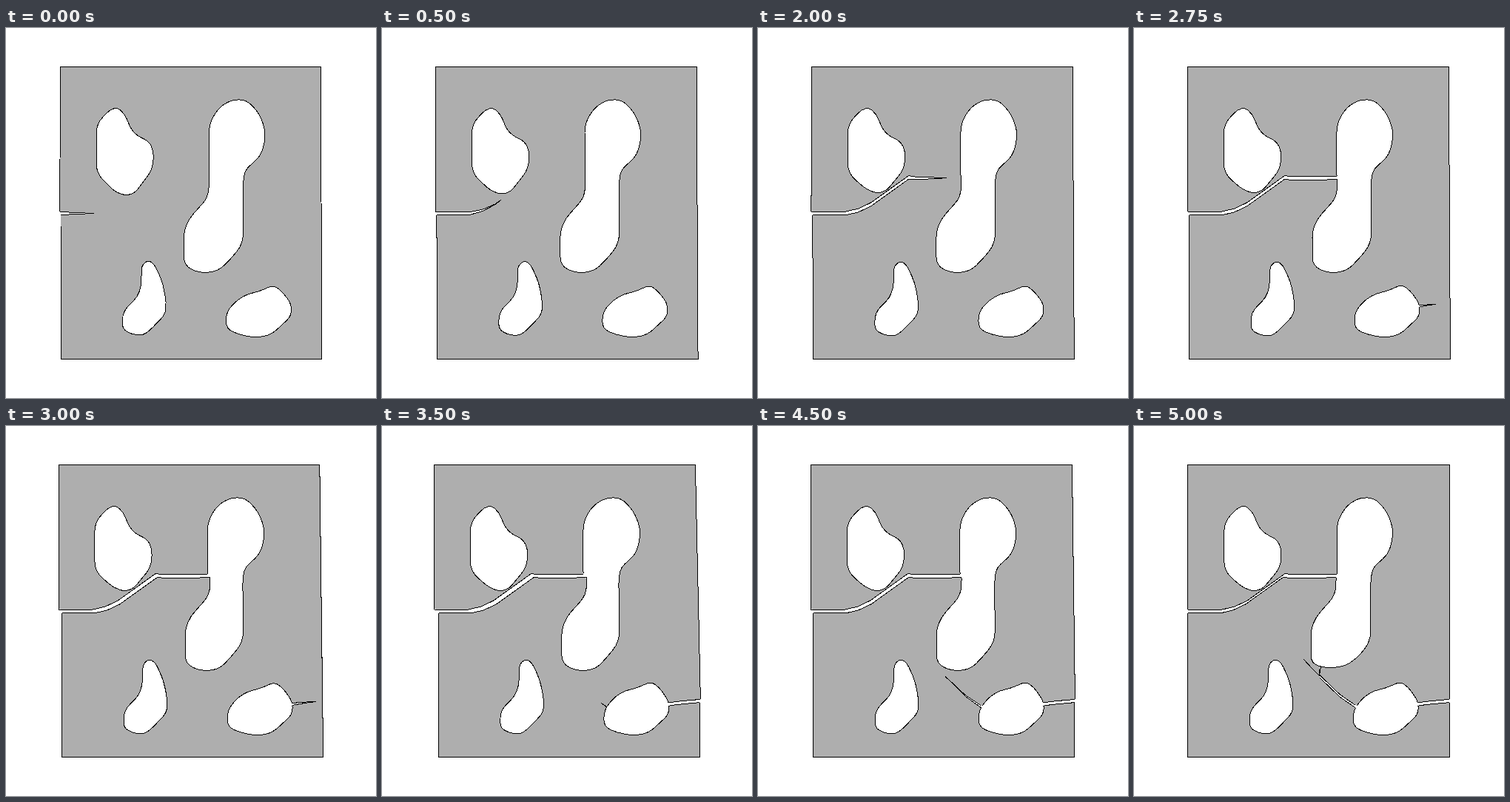
These frames come from a looping animation (500x500 px, 5.25 s). An HTML page:

```html
<!DOCTYPE html>
<html lang="en">
<head>
<meta charset="utf-8">
<title>Crack growth in a plate with holes</title>
<style>
html, body { margin: 0; width: 100%; height: 100%; overflow: hidden; background: #fff; }
svg { display: block; width: 100vw; height: 100vh; }
path { shape-rendering: crispEdges; stroke: #000; stroke-width: 1; fill: none; }
#plate { fill: #aeaeae; }
.hole { fill: #fff; }
.gap { fill: #fff; stroke: none; }
.mouth { stroke: #fff; stroke-width: 3; }
</style>
</head>
<body>
<svg id="stage" viewBox="0 0 500 500"><path id="plate"/></svg>
<script>
const STEP = 250, COUNT = 21, TOP = 52, BOTTOM = 447, RADIUS = 14;

const clamp = v => Math.max(0, Math.min(1, v));
const mix = (a, b, t) => a + (b - a) * t;
const parse = s => s.split(' ').map(p => p.split(',').map(Number));

// Value at step t on a line through "step,value" keys
function track(keys, t) {
  const n = keys.findIndex(k => k[0] >= t);
  if (n < 1) return keys.at(n)[1];
  const [t0, v0] = keys[n - 1], [t1, v1] = keys[n];
  return mix(v0, v1, (t - t0) / (t1 - t0));
}

// Left edge of the upper and lower block, and lean of the edges, by load step
const upperKeys = parse('0,72.6 4,71.6 8,72 11,72 13,69 14,70 17,70.2 20,72.4');
const lowerKeys = parse('0,73.7 4,74.5 6,74.1 11,74.2 13,76.5 18,74.4 20,72.4');
const leanKeys = parse('0,0.2 4,1.2 8,0.9 10,0');

// Corner points, rounded when drawn
const topHole = parse('121.5,129 140,110 150,107 160,116 171,142 193,153 199,166 198,190 174,222 162,226 147,221 121.5,196');
const longHole = parse('274,128 288,106 306,96 325,97 342,115 350,138 349,155 343,173 323,191 320,206 320,291 302,313 286,328 262,331 240,321 240,274 247,257 273,228 274,204 274,199');
const dropHole = parse('183,320 192,313 200,319 211,342 216,370 215,386 194,408 184,415 168,413 157,406 157,383 177,363 182,349');
const rightHole = parse('361,347 372,355 385,372 385,389 358,414 338,418 315,414 297,406 297,383 312,367 326,359 340,356');

const cracks = [
  { line: parse('73,250 118,250 135,246 152,238 203,201.5 212,202.5 274,202'),
    tip: parse('0,118 4,203 8,255 10,274'), from: 0, open: 10, width: 4.8, taper: 0.09 },
  { line: parse('384.5,375.6 395,374 405,373 427,371'),
    tip: parse('10,385 11,407 13,427'), from: 11, open: 13, width: 4.2, taper: 0.09 },
  { line: parse('300,378.5 279,364 252,338 230,316'),
    tip: parse('14,293.3 19,241.8 20,252'), from: 14, open: 20, width: 3.4, taper: 0.06 }
];

const stage = document.getElementById('stage');
const plate = document.getElementById('plate');
const addPath = cls => {
  const el = document.createElementNS('http://www.w3.org/2000/svg', 'path');
  el.setAttribute('class', cls);
  return stage.appendChild(el);
};
const holes = Array.from({ length: 4 }, () => addPath('hole'));
for (const c of cracks) c.paths = ['gap', 'mouth', 'side'].map(addPath);
const branch = addPath('side');

const draw = (el, d) => el.setAttribute('d', d);
const at = ([x, y]) => (x + 0.5).toFixed(2) + ',' + (y + 0.5).toFixed(2);
const line = pts => 'M' + pts.map(at).join('L');

function rounded(pts) {
  const n = pts.length;
  return pts.map((p, i) => {
    const ends = [pts[(i + n - 1) % n], pts[(i + 1) % n]];
    const lens = ends.map(q => Math.hypot(q[0] - p[0], q[1] - p[1]));
    const r = Math.min(RADIUS, lens[0] / 2, lens[1] / 2);
    const [a, b] = ends.map((q, k) => [mix(p[0], q[0], r / lens[k]), mix(p[1], q[1], r / lens[k])]);
    return (i ? 'L' : 'M') + at(a) + 'Q' + at(p) + ' ' + at(b);
  }).join('') + 'Z';
}

// Part of a centre line between its start and the tip at x
function cut(pts, tip) {
  const dir = Math.sign(pts[1][0] - pts[0][0]);
  const n = pts.findIndex(p => (tip - p[0]) * dir <= 0);
  if (n < 1) return pts;
  const [x0, y0] = pts[n - 1], [x1, y1] = pts[n];
  return [...pts.slice(0, n), [tip, mix(y0, y1, (tip - x0) / (x1 - x0))]];
}

// Both lips of a crack: tapered to the tip, or parallel once it is through
function lips(c, step, up, low) {
  const tip = track(c.tip, step), through = step >= c.open;
  const mid = (up + low) / 2;
  return [[-1, up], [1, low]].map(([sign, shift]) => cut(c.line, tip).map(([x, y]) => {
    const d = Math.abs(tip - x);
    const gap = through ? c.width : Math.min(c.width, d * c.taper);
    return [x + mix(mid, shift, through ? 1 : clamp(d / 60)), y + sign * gap / 2];
  }));
}

function drawCrack([gap, mouth, side], [a, b], through) {
  draw(gap, line([...a, ...b.slice().reverse()]) + 'Z');
  draw(mouth, line([a[0], b[0]]) + (through ? line([a.at(-1), b.at(-1)]) : ''));
  draw(side, line(a) + line(b));
}

function render(step) {
  const [main, edge, back] = cracks;
  const a = track(upperKeys, step), b = track(lowerKeys, step), lean = track(leanKeys, step);
  const up = a - upperKeys[0][1], low = b - lowerKeys[0][1];
  const width = 352.4 + 0.035 * step;
  const mouthUp = a - lean * 0.6, mouthLow = b - lean;
  const split = step >= edge.open, meets = step >= back.open;
  const lip = b + width + (b - a) * 0.15;

  const right = split ? [[lip, 369], [b + width, 373]] : [];
  draw(plate, line([[mouthUp, 247], [a, TOP], [a + width, TOP], ...right,
    [b + width, BOTTOM], [b, BOTTOM], [mouthLow, 252]]) + 'Z');

  // The material next to each crack gives way a little
  const lift = 3 * clamp(step / 4), rise = 2 * clamp((step - 10) / 3);
  [
    topHole.map(([x, y]) => [x + up, y > 215 ? y - lift : y]),
    longHole.map(([x, y]) => {
      const shear = mix(up, low, (y - TOP) / (BOTTOM - TOP));
      return [x + (x >= 300 ? shear : y < 202 ? up : low), meets && y > 326 ? y - 4 : y];
    }),
    dropHole.map(([x, y]) => [x + low, y + clamp(step / 4)]),
    rightHole.map(([x, y]) => [x + low, y < 370 ? y - rise : y])
  ].forEach((pts, n) => draw(holes[n], rounded(pts)));

  for (const c of cracks) {
    if (step < c.from) {
      c.paths.forEach(el => draw(el, ''));
      continue;
    }
    const pair = c === main ? lips(c, step, up + 0.6, low - 0.5) : lips(c, step, low, low);
    const through = step >= c.open;
    const [upper, lower] = pair;
    if (c === main) {
      upper[0][0] = mouthUp;
      lower[0][0] = mouthLow;
    }
    if (c === main && through) {
      upper.at(-1)[0] = 274 + up;
      lower.at(-1)[0] = 274 + low;
    }
    if (c === edge && through) {
      upper.at(-1)[0] = lip;
      lower.at(-1)[0] = b + width;
    }
    drawCrack(c.paths, pair, through && c !== back);
  }

  // Final side branch into the long hole
  draw(branch, meets ? line(parse('229,315 240,327 250,337 250,328')) + line(parse('250,337 252,325')) : '');
}

let shown = -1;
function tick() {
  const step = Math.floor(performance.now() / STEP) % COUNT;
  if (step !== shown) render(shown = step);
  requestAnimationFrame(tick);
}
tick();
</script>
</body>
</html>
```
